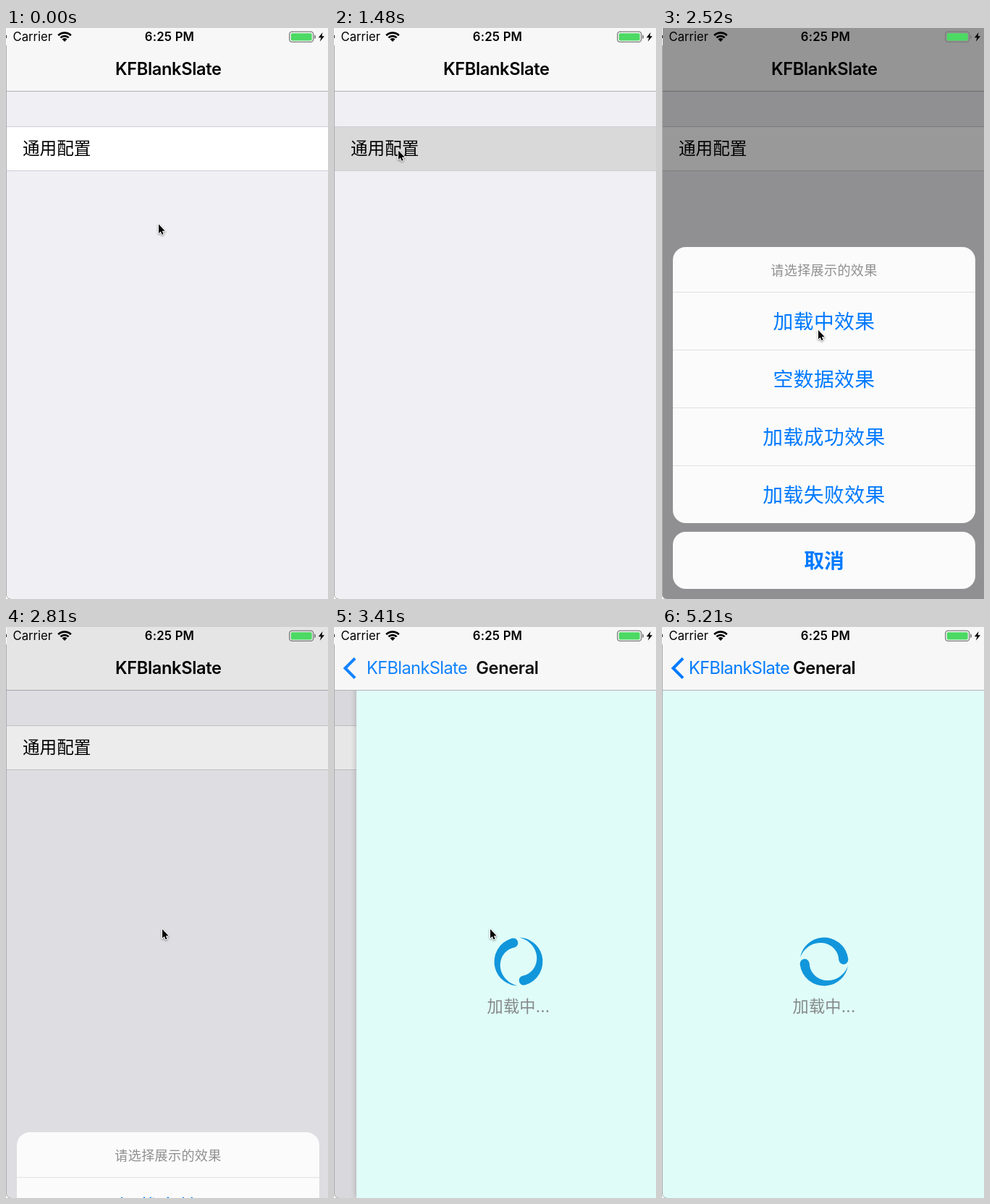
Write an HTML page with a canvas that moves like this. It is 445 px wide and 790 px high and loops after 5.31 s.

```html
<!DOCTYPE html>
<html lang="zh-Hans">
<head>
<meta charset="utf-8">
<title>KFBlankSlate</title>
<style>
  html, body { margin: 0; width: 100%; height: 100%; overflow: hidden; background: #fff; }
  canvas { display: block; width: 445px; height: 790px; }
</style>
</head>
<body>
<canvas id="stage" width="445" height="790"></canvas>
<script>
const W = 445, H = 790, LOOP = 5310;
const BLUE = '#007aff';
const LATIN = 'Inter, "Noto Sans CJK SC", "Noto Sans CJK", sans-serif';
const HAN = '"Noto Sans CJK SC", "Noto Sans CJK", sans-serif';
const ctx = document.getElementById('stage').getContext('2d');

// The screen refreshes about every 148 ms, and rests when nothing moves.
const TICKS = [0, 740, 890, 1040, 1190, 1330, 1480, 1630, 1780, 1930, 2080, 2230, 2370, 2520,
  2810, 2960, 3110, 3260, 3410, 3560, 3710, 3860, 4010, 4160, 4310, 4460, 4610, 4760,
  4910, 5060, 5210];

const clamp = v => Math.min(1, Math.max(0, v));
const mix = (a, b, k) => a + (b - a) * k;
const span = (t, a, b) => clamp((t - a) / (b - a));
const ease = k => k * k * (3 - 2 * k);

// Critically damped spring from 0 to 1.
function spring(t, start, rate) {
  const x = Math.max(0, t - start) * rate;
  return 1 - (1 + x) * Math.exp(-x);
}

function rect(x, y, w, h, fill) {
  ctx.fillStyle = fill;
  ctx.fillRect(x, y, w, h);
}

function roundRect(x, y, w, h, r, fill) {
  ctx.beginPath();
  ctx.roundRect(x, y, w, h, r);
  ctx.fillStyle = fill;
  ctx.fill();
}

function poly(points) {
  ctx.beginPath();
  for (const [x, y] of points) ctx.lineTo(x, y);
}

function text(str, x, y, size, opt = {}) {
  const { weight = 400, family = LATIN, color = '#000', align = 'left', gap = 0 } = opt;
  ctx.font = `${weight} ${size}px ${family}`;
  ctx.letterSpacing = gap + 'px';
  ctx.textAlign = align;
  ctx.fillStyle = color;
  ctx.fillText(str, x, y);
}

function faded(alpha, draw) {
  if (alpha <= 0) return;
  ctx.save();
  ctx.globalAlpha = alpha;
  draw();
  ctx.restore();
}

function listPage(pressed) {
  rect(0, 0, W, H, '#efeff4');
  const tone = Math.round(mix(255, 217, pressed));
  rect(0, 136, W, 62, '#cfcfd3');
  rect(0, 137, W, 60, `rgb(${tone},${tone},${tone})`);
  text('通用配置', 23, 175.2, 23.6, { family: HAN });
}

function spinner(x, y, angle) {
  const R = 33.5, head = 6.5, tail = 2.86, N = 40;
  ctx.fillStyle = '#1296db';
  for (const turn of [0, Math.PI]) {
    ctx.save();
    ctx.translate(x, y);
    ctx.rotate(angle + turn);
    ctx.beginPath();
    ctx.arc(0, 0, R, 0, -tail, true);
    for (let i = N; i >= 0; i--) {
      const s = i / N, r = R - 2 * head * (1 - s ** 1.4);
      ctx.lineTo(r * Math.cos(s * tail), -r * Math.sin(s * tail));
    }
    ctx.fill();
    ctx.beginPath();
    ctx.arc(R - head, 0, head, 0, 7);
    ctx.fill();
    ctx.restore();
  }
}

function loadingPage(t, x) {
  ctx.save();
  ctx.translate(x, 0);
  ctx.shadowColor = 'rgba(0,0,0,.25)';
  ctx.shadowBlur = x > 1 ? 8 : 0;
  rect(0, 0, W, H, '#dffcf8');
  ctx.shadowBlur = 0;
  const angle = (-94 + (t - 4160) * 268 / 1050) * Math.PI / 180;
  spinner(224, 463, angle);
  text('加载中...', 224, 533.3, 22.2, { color: '#858988', align: 'center', gap: 0.2 });
  ctx.restore();
}

function navBar(push) {
  rect(0, 0, W, 87, '#f7f7f7');
  rect(0, 87, W, 1, '#b2b2b4');
  const x = mix(151, 37, push);
  faded(1 - push * 1.6, () => text('KFBlankSlate', x, 65, 23.6, { weight: 600, gap: -0.35 }));
  faded(push, () => {
    text('KFBlankSlate', x, 65, 23.6, { color: BLUE, gap: -0.6 });
    text('General', mix(400, 181, push), 65, 23.6, { weight: 600, gap: -0.35 });
    poly([[29, 43.3], [15.4, 57], [29, 70.7]]);
    ctx.lineWidth = 4;
    ctx.strokeStyle = BLUE;
    ctx.stroke();
  });
}

function wifi(x, y) {
  const from = -Math.PI * 0.75, to = -Math.PI * 0.25;
  ctx.strokeStyle = ctx.fillStyle = '#000';
  ctx.lineWidth = 2.7;
  for (const r of [12.4, 7.9]) {
    ctx.beginPath();
    ctx.arc(x, y, r, from, to);
    ctx.stroke();
  }
  ctx.beginPath();
  ctx.moveTo(x, y);
  ctx.arc(x, y, 4.9, from, to);
  ctx.fill();
}

function statusBar() {
  text('Carrier', 9.5, 18.3, 16.7);
  wifi(81, 19);
  text('6:25 PM', 226, 18.3, 16.7, { weight: 600, align: 'center', gap: 0.2 });
  ctx.beginPath();
  ctx.roundRect(391.7, 5.2, 33, 14.2, 3.6);
  ctx.lineWidth = 1.3;
  ctx.strokeStyle = '#7c7c7c';
  ctx.stroke();
  roundRect(393.8, 7.2, 28.9, 10.2, 1.6, '#4cd964');
  roundRect(426.2, 9.6, 1.8, 5.4, [0, 1.8, 1.8, 0], '#7c7c7c');
  poly([[437.6, 6], [431.8, 13.2], [435.4, 13.2], [433.8, 18.8], [440, 11.2], [436.4, 11.2]]);
  ctx.fillStyle = '#000';
  ctx.fill();
}

function sheet(dy) {
  const label = (str, y, size, opt) =>
    text(str, 224, y + size * 0.37, size, { family: HAN, align: 'center', ...opt });
  ctx.save();
  ctx.translate(0, dy);
  roundRect(15, 303, 418, 382, 18, '#fbfbfb');
  label('请选择展示的效果', 335, 18.07, { color: '#8f8f8f', gap: 0.35 });
  ['加载中效果', '空数据效果', '加载成功效果', '加载失败效果'].forEach((str, i) => {
    rect(15, 365 + 80 * i, 418, 1, '#e0e0e2');
    label(str, 405.5 + 80 * i, 27.8, { color: BLUE, gap: 0.45 });
  });
  roundRect(15, 697, 418, 79, 18, '#fbfbfb');
  label('取消', 737, 27.8, { color: BLUE, weight: 600 });
  ctx.restore();
}

function windowEdge() {
  rect(0, 0, 1, 24, '#fff');
  rect(0, 10, 1, 4, '#333');
  rect(0, 24, 1, 761, '#adadb0');
  ctx.beginPath();
  ctx.moveTo(0, 784);
  ctx.quadraticCurveTo(0.5, 789.5, 6, 790);
  ctx.lineTo(0, 790);
  ctx.fillStyle = '#fff';
  ctx.fill();
  ctx.beginPath();
  ctx.moveTo(0.5, 784);
  ctx.quadraticCurveTo(0.8, 789.2, 6, 789.7);
  ctx.lineWidth = 1;
  ctx.strokeStyle = '#adadb0';
  ctx.stroke();
}

const MOVES = [
  [700, 1400, 89, 169.5],
  [1520, 1780, 95, 178],
  [1790, 2500, 216, 418],
  [4330, 4620, 329, 681]
];

function pointer(t) {
  if (t >= 4700) return;
  let x = 211, y = 271.5;
  for (const [from, to, nx, ny] of MOVES) {
    const k = ease(span(t, from, to));
    x = mix(x, nx, k);
    y = mix(y, ny, k);
  }
  ctx.save();
  ctx.translate(x, y);
  poly([[0, 0], [0, 12.6], [2.8, 10], [4.6, 14.3], [6.6, 13.4], [4.8, 9.3], [8.7, 9.3]]);
  ctx.closePath();
  ctx.lineWidth = 2;
  ctx.lineJoin = 'round';
  ctx.strokeStyle = '#fff';
  ctx.shadowColor = 'rgba(0,0,0,.45)';
  ctx.shadowBlur = 2.5;
  ctx.shadowOffsetY = 1;
  ctx.stroke();
  ctx.shadowColor = 'transparent';
  ctx.fillStyle = '#000';
  ctx.fill();
  ctx.restore();
}

function draw(t) {
  const shown = spring(t, 1500, 0.0222) - spring(t, 2671, 0.0222);
  const push = spring(t, 3130, 0.0155);
  const pressed = t < 1400 ? 0 : 1 - span(t, 1600, 1880);

  ctx.clearRect(0, 0, W, H);
  if (push < 0.999) {
    ctx.save();
    ctx.translate(-0.3 * W * push, 0);
    listPage(pressed);
    ctx.restore();
    if (push > 0) rect(0, 0, W, H, `rgba(0,0,0,${0.1 * push})`);
  }
  if (push > 0) loadingPage(t, push < 0.999 ? W * (1 - push) : 0);
  navBar(push < 0.999 ? push : 1);
  if (shown > 0.001) rect(0, 0, W, H, `rgba(0,0,0,${0.4 * shown})`);
  statusBar();
  if (shown > 0.001) sheet(487 * (1 - shown));
  windowEdge();
  pointer(t);
}

const start = performance.now();
function tick() {
  const t = (performance.now() - start) % LOOP;
  draw(TICKS.findLast(v => v <= t));
  requestAnimationFrame(tick);
}
tick();
</script>
</body>
</html>
```
